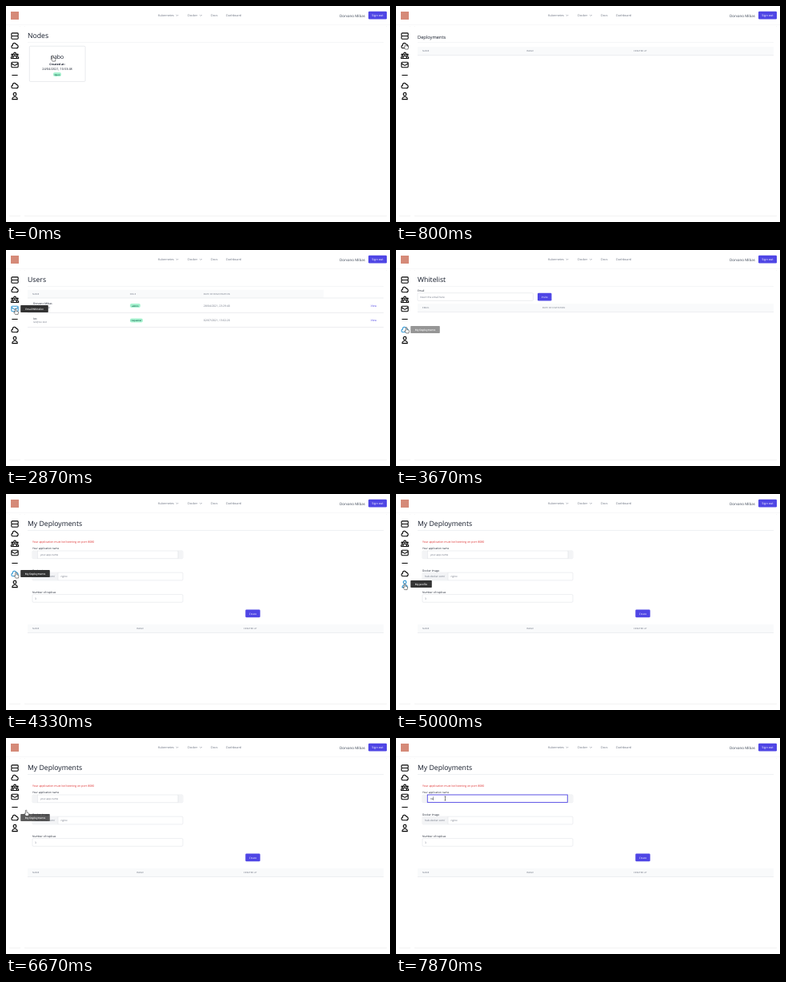
Animation of 480x270 px, one loop 8 s. Source, as an HTML page:

```html
<!DOCTYPE html>
<html lang="en">
<head>
<meta charset="utf-8">
<title>Cluster dashboard</title>
<style>
  html, body { margin: 0; width: 100%; height: 100%; overflow: hidden; background: #fff; }
  svg { display: block; width: 100%; height: 100%; }
  text { font-family: "Open Sans", "Noto Sans", sans-serif; white-space: pre; text-rendering: geometricPrecision; }
  .card { fill: #fff; filter: drop-shadow(0 .4px .7px rgba(0, 0, 0, .2)); }
  .icon { fill: none; stroke-width: 2.4; stroke-linecap: round; stroke-linejoin: round; }
</style>
</head>
<body>
<svg id="stage" viewBox="0 0 480 270"></svg>
<script>
const LOOP = 8000, STEP = 1000 / 15;
const INK = '#111827', GREY = '#6b7280', INDIGO = '#4f46e5', LINE = '#d1d5db', HOVER = '#3398d4';
const USER = 'Dorvano Mibas', JOINED = '28/04/2021, 23:29:40';

const text = (x, y, s, size = 3.3, fill = INK, extra = '') =>
  `<text x="${x}" y="${y}" font-size="${size}" fill="${fill}" ${extra}>${s}</text>`;
const rect = (x, y, w, h, fill, extra = '') =>
  `<rect x="${x}" y="${y}" width="${w}" height="${h}" fill="${fill}" ${extra}/>`;
const rule = (x, y, w, color = '#e5e7eb') => rect(x, y, w, .4, color);
const centred = (x, y, s, size, fill, weight = 400) =>
  text(x, y, s, size, fill, `text-anchor="middle" font-weight="${weight}"`);
const button = (x, y, w, label, size = 3.2) =>
  rect(x, y, w, 9.8, INDIGO, 'rx="1.3"') + centred(x + w / 2, y + 6.1, label, size, '#fff', 500);
const field = (x, y, w, value = '', color = INK, pad = 3) =>
  rect(x, y, w, 9.7, '#fff', `rx="1.2" stroke="${LINE}" stroke-width=".4"`) +
  text(x + pad, y + 6, value, 3.2, color);
const badge = (x, y, w, label) =>
  rect(x, y, w, 5, '#a7f3d0', 'rx="2"') + centred(x + w / 2, y + 3.6, label, 2.75, '#065f46', 600);
const title = (s, size = 8.7) => text(27, size > 6 ? 40.2 : 41, s, size) + rule(27, 45.3, 445);
const head = (y, w, cols) => rect(27, y, w, 10, '#f9fafb') + rule(27, y + 10, 445, LINE) +
  cols.map(([x, s]) => text(x, y + 6, s, 2.75, GREY, 'letter-spacing=".13"')).join('');
const tableCols = [[33, 'NAME'], [163, 'IMAGE'], [297, 'CREATED AT']];

const userRow = (y, name, mail, role, roleWidth, date) =>
  text(34, y + 8.5, name, 3.35, INK, 'font-weight="500"') + text(34, y + 13, mail, 3, GREY) +
  badge(155, y + 7.4, roleWidth, role) + text(247, y + 11, date, 3.37, GREY) +
  text(455.7, y + 11, 'View', 3.4, INDIGO) + rule(27, y + 18.5, 445, LINE);

const pages = {
  nodes: title('Nodes') +
    rect(29.3, 50.2, 69.8, 44.2, '#fff', `rx="1.3" stroke="${LINE}" stroke-width=".5"`) +
    centred(64, 65.8, 'nabo', 7, INK) + centred(64, 73.8, 'Created at:', 3.5, INK, 700) +
    centred(64, 80.3, '24/04/2021, 10:53:48', 3.85, INK) + badge(59, 83, 10, 'Open'),
  deployments: title('Deployments', 5.7) + head(51, 445, tableCols),
  users: title('Users') +
    head(49.8, 370, [[33, 'NAME'], [155, 'ROLE'], [247, 'DATE OF REGISTRATION']]) +
    '<g id="rows">' +
    userRow(59.7, USER, 'dmb@mail.test', 'admin', 13, JOINED) +
    userRow(78, 'Ivo', 'ivo@ivo.test', 'requester', 16, '02/07/2021, 13:02:20') + '</g>',
  whitelist: title('Whitelist') + text(27, 51.8, 'Email') +
    field(27, 53.7, 144.5, 'Insert the email here', GREY) + button(177, 53.7, 17.5, 'Invite') +
    head(67.2, 445, [[33, 'EMAIL'], [183, 'DATE OF INVITATION']]),
  mine: title('My Deployments') + rect(27, 46, 296, 111, '#fff', 'class="card"') + rule(27, 45.3, 445) +
    text(33, 60.5, 'Your application must be listening on port 8080', 3.5, '#dc2626') +
    text(33, 69, 'Your application name', 3.2) + field(33, 71, 188) +
    rect(33.2, 71.2, 6, 9.3, '#f3f4f6') + rect(215, 71.2, 5.8, 9.3, '#f3f4f6') +
    rect(39, 71, .4, 9.7, LINE) + rect(214.8, 71, .4, 9.7, LINE) +
    text(43, 77, 'your-app-name', 3.1, GREY, 'id="hint"') +
    '<g id="focus">' + rect(39.3, 71, 175, 9.4, '#fff', `stroke="${INDIGO}" stroke-width=".9"`) +
    text(43, 77, '', 3.2, INK, 'id="typed"') + rect(42.7, 73.2, .4, 4.8, INK, 'id="caret"') + '</g>' +
    text(33, 96.5, 'Docker Image', 3.3) + field(33, 98.2, 188, 'nginx', GREY, 35.5) +
    rect(33.2, 98.4, 31.6, 9.3, '#f3f4f6') + rect(64.8, 98.2, .4, 9.7, LINE) +
    text(36, 104.2, 'hub.docker.com/', 3.2, GREY) +
    text(33, 124, 'Number of replicas', 3.3) + field(33, 125.6, 188, '3', GREY) +
    button(299.3, 144.4, 18.4, 'Create') + head(163, 445, tableCols),
  profile: title('My profile') +
    [['Name', USER, 144.5], ['Password', 'Insert the password here', 144.5], ['Email', 'dmb@mail.test', 144.5],
     ['Role', 'admin', 69.5], ['Date of registration', JOINED, 69.5]].map(([label, value, w], i) => {
      const y = 53.8 + 21.5 * i;
      return text(27, y - 2, label) + field(27, y, w, value, i === 1 ? GREY : INK) +
        (i < 2 ? button(177, y, 16, 'Save') : '');
    }).join(''),
};

const cloud = 'M3 15a4 4 0 004 4h9a5 5 0 10-.1-10 5 5 0 10-9.8 2.1A4 4 0 003 15z';
const icons = [
  [37.5, 'M5 12h14M5 12a2 2 0 01-2-2V6a2 2 0 012-2h14a2 2 0 012 2v4a2 2 0 01-2 2M5 12a2 2 0 00-2 2v4a2 2 0 002 2h14a2 2 0 002-2v-4a2 2 0 00-2-2', 'Nodes', 20],
  [49.5, cloud, 'Deployments', 32],
  [61.8, 'M7 20h10v-2a5 5 0 00-10 0zM7 20H2v-2a3 3 0 015.4-1.9M17 20h5v-2a3 3 0 00-5.4-1.9M15 7a3 3 0 11-6 0 3 3 0 016 0zM21 10a2 2 0 11-4 0 2 2 0 014 0zM7 10a2 2 0 11-4 0 2 2 0 014 0z', 'Users', 20],
  [73.5, 'M3 8l7.9 5.3a2 2 0 002.2 0L21 8M5 19h14a2 2 0 002-2V7a2 2 0 00-2-2H5a2 2 0 00-2 2v10a2 2 0 002 2z', 'Email Whitelist', 35],
  [86.5, 'M19 12H5'],
  [99.5, cloud, 'My Deployments', 37],
  [112.5, 'M16 7a4 4 0 11-8 0 4 4 0 018 0zM12 14a7 7 0 00-7 7h14a7 7 0 00-7-7z', 'My profile', 27],
];
const chevron = x => `<path d="M${x} 11l1.4 1.4 1.4-1.4" fill="none" stroke="${GREY}" stroke-width=".5"/>`;
const nav = [[190, 'Kubernetes'], [227, 'Docker'], [256, 'Docs'], [275, 'Dashboard']];

const stage = document.getElementById('stage');
stage.innerHTML =
  rect(0, 0, 480, 270, '#fff') + rule(0, 23, 480, '#ececef') +
  rect(6, 7, 10, 10, '#d58a78') +
  nav.map(([x, s]) => text(x, 13.2, s, 3.72, GREY)).join('') + chevron(212.6) + chevron(242.2) +
  text(417, 13.7, USER, 4.5, '#374151') + button(453, 6.7, 23, 'Sign out', 3.8) +
  rect(4, 25, 14, 237.5, '#fff', 'class="card" rx="1"') +
  rect(23, 25, 453, 237.5, '#fff', 'class="card" rx="1"') +
  Object.entries(pages).map(([id, body]) => `<g id="${id}">${body}</g>`).join('') +
  icons.map(([y, d]) => `<path class="icon" d="${d}" transform="translate(5.5 ${y - 5.5}) scale(.46)"/>`).join('') +
  icons.map(([y, , label, w]) => '<g class="tip">' + (label
    ? rect(18.2, y - 4.6, w - .4, 9.2, '#333', 'rx=".8"') + centred(18 + w / 2, y + 1.1, label, 3.15, '#fff', 600) : '') + '</g>').join('') +
  '<g id="cursor"><path id="hand" d="M-.8.6a.8.8 0 011.6 0v2.2l1.9.5q.9.3.8 1.2l-.5 2.6H-.3l-2-2.8q.2-1 1.5.1z" fill="#fff" stroke="#111" stroke-width=".5"/>' +
  '<path id="beam" d="M-.9-2.5h1.8M0-2.5v5M-.9 2.5h1.8" stroke="#111" stroke-width=".5"/></g>';

const el = id => document.getElementById(id);
const iconEls = [...document.querySelectorAll('.icon')];
const tipEls = [...document.querySelectorAll('.tip')];
const show = (node, on) => { node.style.display = on ? '' : 'none'; };

// [ms, x, y]
const path = [
  [0, 58.5, 62], [70, 58, 61], [270, 40, 40], [400, 24, 24], [530, 12, 38], [800, 12, 47], [930, 12, 48],
  [1070, 12, 49.5], [1300, 12, 49.5], [1670, 12.5, 60], [1900, 12.5, 61], [2130, 12, 77], [2400, 12, 75],
  [2870, 12, 73.5], [3130, 12, 73.5], [3470, 12, 86], [3670, 13, 97], [3930, 12.5, 98], [4650, 12.5, 98],
  [5000, 11, 112.5], [5270, 11, 112.5], [5530, 9, 112], [5780, 9, 112], [6070, 9, 100], [6600, 9, 98],
  [6670, 26, 90], [6800, 61.5, 75.5], [LOOP, 61.5, 75.5],
];
const pageTimes = [[0, 'nodes'], [800, 'deployments'], [2000, 'users'], [3200, 'whitelist'],
  [4200, 'mine'], [5330, 'profile'], [6400, 'mine']];
// [icon, pointer enters, pointer leaves]
const hovers = [[1, 900, 1330], [2, 1650, 2060], [3, 2200, 3180], [5, 3520, 4700],
  [6, 4760, 5800], [5, 5940, 6640]];

const clamp = v => Math.max(0, Math.min(1, v));
function pointer(t) {
  const i = Math.max(1, path.findIndex(p => p[0] > t));
  const [a, b] = [path[i - 1], path[i]];
  const k = clamp((t - a[0]) / (b[0] - a[0]));
  return [a[1] + (b[1] - a[1]) * k, a[2] + (b[2] - a[2]) * k];
}

function draw(t) {
  const page = pageTimes.filter(p => p[0] <= t).pop()[1];
  Object.keys(pages).forEach(id => show(el(id), id === page));
  show(el('rows'), t >= 2190);

  iconEls.forEach((icon, i) => {
    let opacity = 0, over = false;
    hovers.filter(h => h[0] === i).forEach(([, from, to]) => {
      over = over || (t >= from && t < to);
      opacity = Math.max(opacity, Math.min(clamp((t - from - 60) / 170), clamp((to + 130 - t) / 130)));
    });
    icon.setAttribute('stroke', over ? HOVER : '#050505');
    tipEls[i].style.opacity = opacity;
  });

  const typed = t >= 7860 ? 'ne' : t >= 7790 ? 'n' : '';
  show(el('focus'), t >= 6990);
  show(el('hint'), !typed);
  if (t >= 6990) el('focus').after(el('hint'));
  el('typed').textContent = typed;
  el('caret').setAttribute('x', 42.7 + 1.9 * typed.length);
  show(el('caret'), t < 7460 || typed);

  const [x, y] = pointer(t);
  el('cursor').setAttribute('transform', `translate(${x} ${y})`);
  show(el('hand'), t < 6730);
  show(el('beam'), t >= 6730);
}

const start = performance.now();
function tick() {
  const t = (performance.now() - start) % LOOP;
  draw(Math.floor((t + 4) / STEP) * STEP);
  requestAnimationFrame(tick);
}
tick();
</script>
</body>
</html>
```
